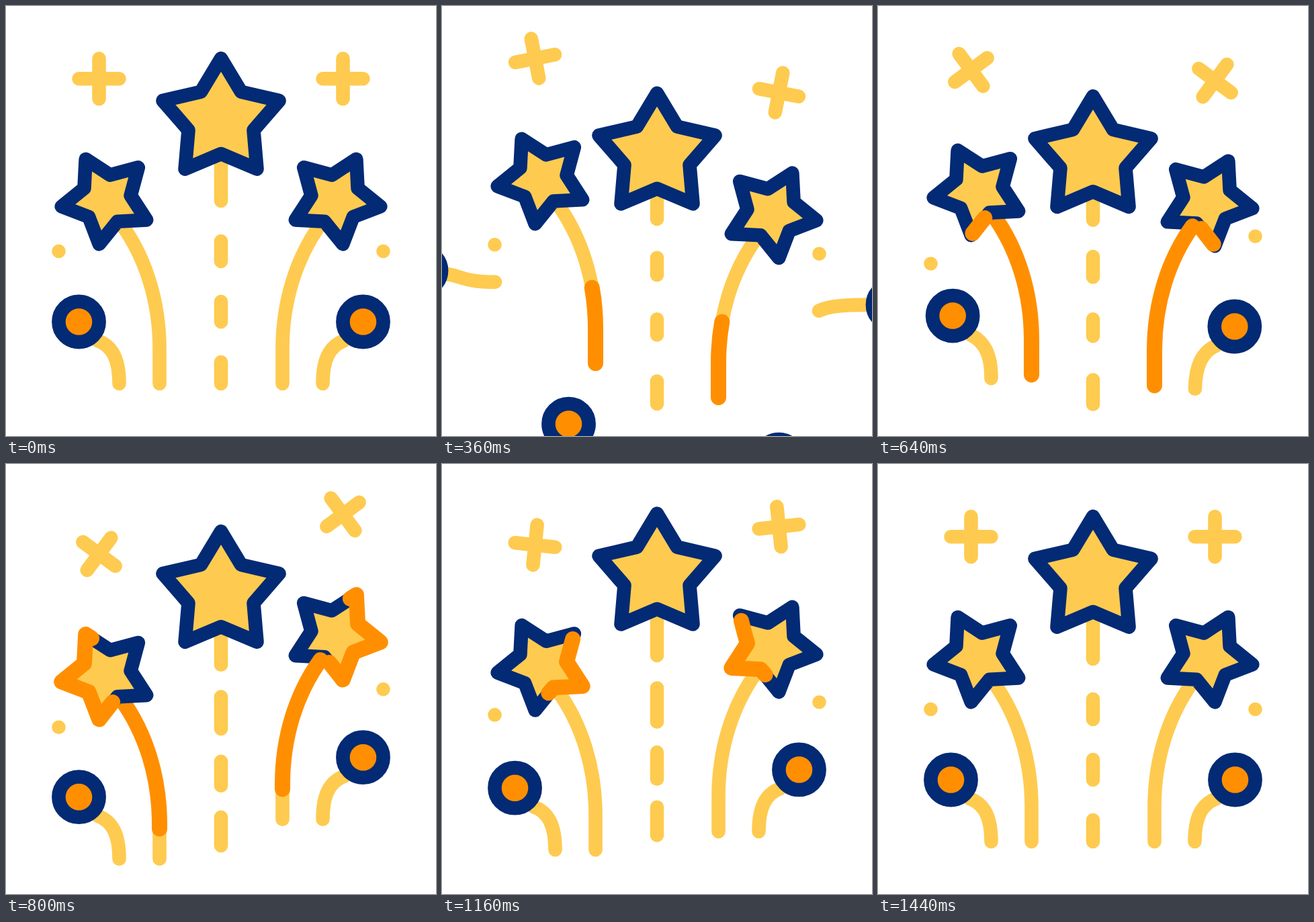
Animation of 640 by 640 pixels, one loop 1.48 s. Source, as an HTML page:

```html
<!DOCTYPE html>
<html lang="en">
<head>
<meta charset="utf-8">
<title>Fireworks icon</title>
<style>
  html, body { margin: 0; height: 100%; overflow: hidden; background: #fff; }
  svg { display: block; width: 100vw; height: 100vh; }
  path, circle { fill: none; stroke-width: 20.6; stroke-linecap: round; stroke-linejoin: round; }
  .line { stroke: #fecb50; }
  .spark { stroke: #ff8f00; stroke-width: 23; }
  .star { fill: #fecb50; stroke: #032a74; }
  .ball { fill: #ff8f00; stroke: #032a74; }
  .dot { fill: #fecb50; }
</style>
</head>
<body>
<svg id="stage" viewBox="0 0 640 640"></svg>
<script>
const LOOP = 1480, STEP = 40, HOLD = 120;
const stage = document.getElementById('stage');

function add(parent, tag, attrs = {}) {
  const node = document.createElementNS('http://www.w3.org/2000/svg', tag);
  for (const name in attrs) node.setAttribute(name, attrs[name]);
  return parent.appendChild(node);
}
const set = (node, name, value) => node.setAttribute(name, value);
const mix = (a, b, k) => a + (b - a) * k;

// Cosine-eased progress from 0 to 1 between two times.
function ease(t, from, to) {
  const u = Math.min(1, Math.max(0, (t - from) / (to - from)));
  return (1 - Math.cos(Math.PI * u)) / 2;
}
function track(t, times, values) {
  let i = 0;
  while (i < times.length - 2 && t > times[i + 1]) i++;
  return mix(values[i], values[i + 1], ease(t, times[i], times[i + 1]));
}

// Star corners, alternating tip and notch, clockwise from the given angle.
function starPoints(cx, cy, tip, notch, angle) {
  return Array.from({ length: 10 }, (_, i) => {
    const a = (angle + i * 36) * Math.PI / 180, r = i % 2 ? notch : tip;
    return [cx + r * Math.cos(a), cy + r * Math.sin(a)];
  });
}
const polygon = points => 'M' + points.join('L') + 'Z';

function trim(node, start, end) {
  set(node, 'visibility', end - start > 0.001 ? 'visible' : 'hidden');
  set(node, 'stroke-dasharray', `${Math.max(0, end - start)} 3`);
  set(node, 'stroke-dashoffset', -start);
}

function makeRocket(parent) {
  const group = add(parent, 'g');
  const tail = add(group, 'path', { class: 'line' });
  add(group, 'circle', { class: 'ball', r: 30.1 });
  return (x, y, from, to, k) => {
    const p = from.map((pt, i) => pt.map((v, j) => mix(v, to[i][j], k)));
    set(group, 'transform', `translate(${x} ${y})`);
    set(tail, 'd', `M${p[0]}C${p.slice(1).join(' ')}`);
  };
}

const SWING = [80, 500, 1020, 1360];
const BOUNCE = [80, 480, 870, 1380];
const DRIFT = [80, 340, 780, 1020, 1400];
const STEM = 'M228.5 562V510C228.5 440 208 375 172 325';
const REST_TAIL = [[28, 28], [49.5, 36], [60, 55], [60, 92]];

function makeSide({ mirrored, bounce, drift, exitTail, enterTail, enterX, enterY }) {
  const side = add(stage, 'g', mirrored ? { transform: 'translate(640 0) scale(-1 1)' } : {});
  const plus = add(side, 'path', { class: 'line', d: 'M0 -30V30M-30 0H30' });
  const dot = add(side, 'circle', { class: 'dot', cx: 78.5, r: 10.3 });
  const leaving = makeRocket(side), entering = makeRocket(side);

  const body = add(side, 'g');
  const points = starPoints(149.2, 287.9, 67.3, 36.8, 99);
  const origin = [158.8, 328.7];
  add(body, 'path', { class: 'line', d: STEM });
  const stemSpark = add(body, 'path', { class: 'spark', d: STEM, pathLength: 1 });
  const star = add(body, 'path', { class: 'star', d: polygon(points) });
  if (mirrored) body.insertBefore(star, stemSpark);
  const starSpark = add(body, 'path', {
    class: 'spark', pathLength: 1, d: 'M' + [origin, ...points, origin].join('L')
  });

  return t => {
    const dy = track(t, BOUNCE, bounce);
    set(body, 'transform', `translate(0 ${dy})`);
    set(plus, 'transform', `translate(138.5 ${108.3 + dy}) rotate(${-90 * ease(t, 60, 1380)})`);
    set(dot, 'cy', 365 + track(t, DRIFT, drift));

    trim(stemSpark, ease(t, 680, 1110), ease(t, 200, 540));
    trim(starSpark, ease(t, 790, 1380), ease(t, 560, 1040));

    const out = Math.pow(Math.max(0, t - 80) / 280, 1.7);
    leaving(108.5 - 139.5 * out, 470 + dy - 64 * out + 18 * out * out,
      REST_TAIL, exitTail, Math.min(1, out));

    const left = 1 - ease(t, 200, 680);
    entering(108.5 + enterX[0] * left + enterX[1] * left * left, 470 + dy + enterY * left,
      REST_TAIL, enterTail, Math.min(1, left * 4));
  };
}

// Each dash end: resting place and its shift at the two extremes of the swing.
const DASHES = [
  [[200, 69, -6], [290, 36, -8]],
  [[350, 33, -26], [380, 27, 6]],
  [[440, 35, -17], [470, 26, -2]],
  [[530, 38, -30], [562, 40, -15]]
];
function makeCentre() {
  const dashes = add(stage, 'path', { class: 'line' });
  const star = add(stage, 'path', {
    class: 'star', d: polygon(starPoints(320, 169, 91, 51, -90))
  });
  return t => {
    const at = ([y, low, high]) => y + track(t, SWING, [0, low, high, 0]);
    set(dashes, 'd', DASHES.map(([a, b]) => `M320 ${at(a)}V${at(b)}`).join(''));
    set(star, 'transform', `translate(0 ${track(t, SWING, [0, 69, -6.5, 0])})`);
  };
}

const parts = [
  makeCentre(),
  makeSide({
    mirrored: false,
    bounce: [0, -38, 31, 0],
    drift: [0, -10, 27, 12, 0],
    exitTail: [[30, 4], [58, 6], [60, 17], [110, 17]],
    enterTail: [[11.5, 34], [8.5, 76], [26.5, 78], [20.5, 108]],
    enterX: [156.7, -66.7], enterY: 243
  }),
  makeSide({
    mirrored: true,
    bounce: [0, 26, -38.3, 0],
    drift: [0, 4, -30, -15, 0],
    exitTail: [[30, 0], [65, 0], [95, 1], [110, 9]],
    enterTail: [[12, 30], [22, 54], [34, 80], [44, 104]],
    enterX: [40, 0], enterY: 246
  })
];

function draw(now) {
  const ms = now % LOOP;
  const t = ms < HOLD ? 0 : Math.floor(ms / STEP) * STEP;
  parts.forEach(update => update(t));
}
const start = performance.now();
function tick() {
  draw(performance.now() - start);
  requestAnimationFrame(tick);
}
tick();
</script>
</body>
</html>
```
